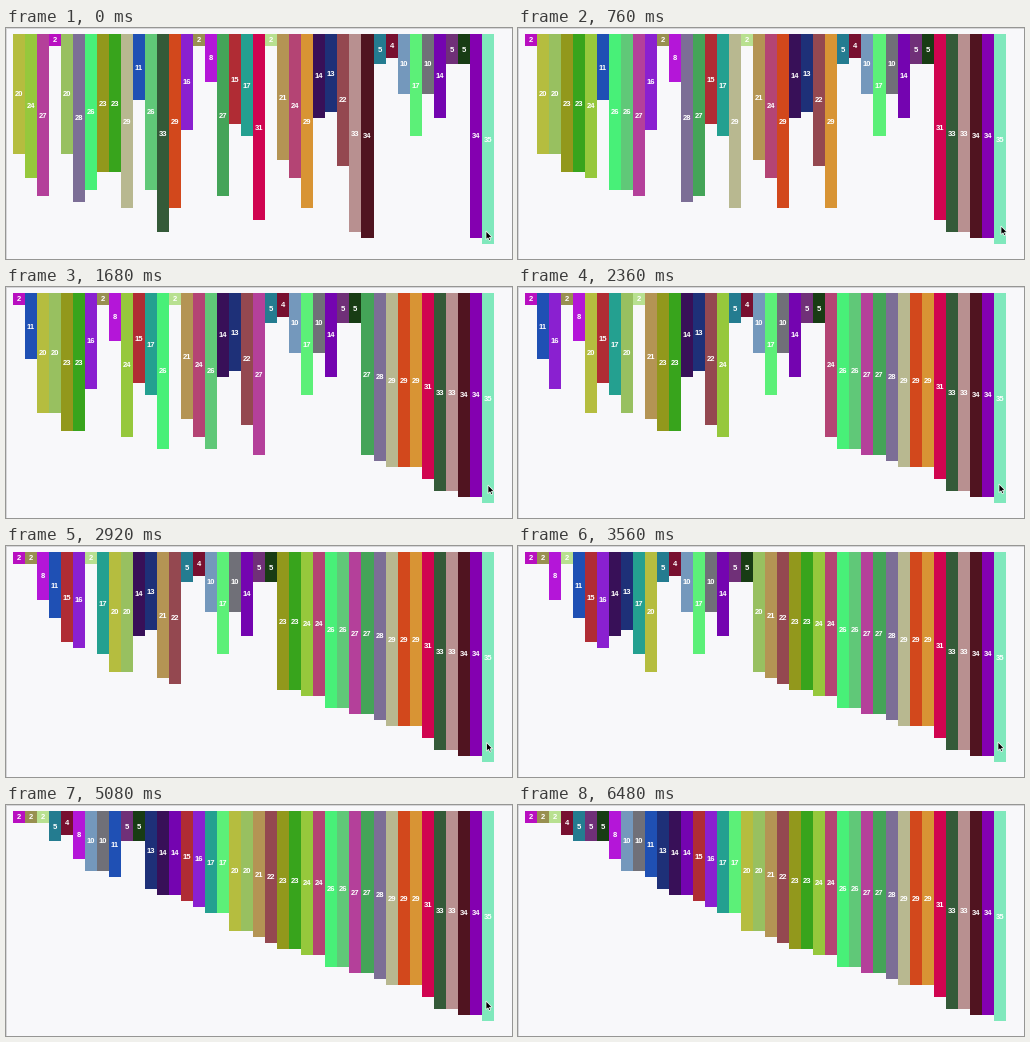
Animation of 506x231 px, one loop 6.52 s. Source, as a matplotlib script:

```python
import matplotlib.pyplot as plt
import numpy as np
from matplotlib.animation import FuncAnimation
from matplotlib.patches import Polygon, Rectangle

W, H, DPI = 506, 231, 128
PX = 72 / DPI  # points per pixel
FRAMES, INTERVAL = 163, 40
TOP, UNIT = 6, 6
START = 29  # the sweep is already partway through a pass

BARS = [
    (20, "#b5bd3f"), (24, "#96c83c"), (27, "#b4409a"), (2, "#b80fc0"),
    (20, "#98c060"), (28, "#7c6e96"), (26, "#48f078"), (23, "#92981c"),
    (23, "#38a41c"), (29, "#b8b890"), (11, "#1f50b4"), (26, "#60c878"),
    (33, "#345a38"), (29, "#d2481c"), (16, "#8a20d0"), (2, "#989050"),
    (8, "#b416d8"), (27, "#44a458"), (15, "#b02c34"), (17, "#24a090"),
    (31, "#d00450"), (2, "#b8e090"), (21, "#b49454"), (24, "#b44474"),
    (29, "#d89434"), (14, "#381058"), (13, "#1e3078"), (22, "#944850"),
    (33, "#b89090"), (34, "#501420"), (5, "#247c90"), (4, "#781030"),
    (10, "#7498bc"), (17, "#5cf078"), (10, "#707078"), (14, "#7404b0"),
    (5, "#703078"), (5, "#183c14"), (34, "#8400b0"), (35, "#80e8bc"),
]
N = len(BARS)
ARROW = np.array([(0, 0), (0, 8.6), (2, 6.8), (3.3, 9.7),
                  (4.7, 9.1), (3.5, 6.3), (6, 6.1)])


def left(i):
    return round(6.6 + 12.03 * i)


def steps_at(frame):
    return int(np.interp(frame, [0, 19, 162], [0, 140, 140 + 8.12 * 143]))


def bubble_orders():
    """Order of the bars in every frame, N - 1 comparisons per pass."""
    order, done, orders = list(range(N)), 0, []
    for frame in range(FRAMES):
        while done < steps_at(frame):
            j = (START + done) % (N - 1)
            a, b = order[j], order[j + 1]
            if BARS[a][0] > BARS[b][0]:
                order[j], order[j + 1] = b, a
            done += 1
        orders.append(order.copy())
    return orders


ORDERS = bubble_orders()

fig = plt.figure(figsize=(W / DPI, H / DPI), dpi=DPI, facecolor="#f8f8fa")
ax = fig.add_axes([0, 0, 1, 1])
ax.set(xlim=(0, W), ylim=(H, 0))
ax.axis("off")

for w, h in ((W, 1), (1, H)):
    ax.add_patch(Rectangle((0, 0), w, h, fc="#d6d6d8", lw=0, aa=False))

rects, labels = [], []
for value, color in BARS:
    rects.append(ax.add_patch(Rectangle((0, TOP), 12, value * UNIT, fc=color,
                                        lw=0, aa=False)))
    labels.append(ax.text(0, TOP + value * UNIT / 2, str(value), color="white",
                          family="Liberation Sans", weight="bold",
                          size=7.6 * PX, ha="center",
                          va="center_baseline", zorder=3))

cursor = ax.add_patch(Polygon(ARROW, fc="black", ec="white", lw=0.7 * PX,
                              zorder=5))


def update(frame):
    for slot, k in enumerate(ORDERS[frame]):
        x = left(slot)
        rects[k].set_x(x)
        rects[k].set_width(left(slot + 1) - x)
        labels[k].set_x(x + 5.7)
    keys = [0, 19, 42, 59, 89, 127]
    tip = (np.interp(frame, keys, [480, 483, 482, 481, 480, 480]),
           np.interp(frame, keys, [203, 198, 198, 197, 196, 196]))
    cursor.set_xy(ARROW + tip)
    cursor.set_visible(frame < 156)
    return [*rects, *labels, cursor]


anim = FuncAnimation(fig, update, frames=FRAMES, interval=INTERVAL,
                     repeat=True, repeat_delay=0)
plt.show()
```
